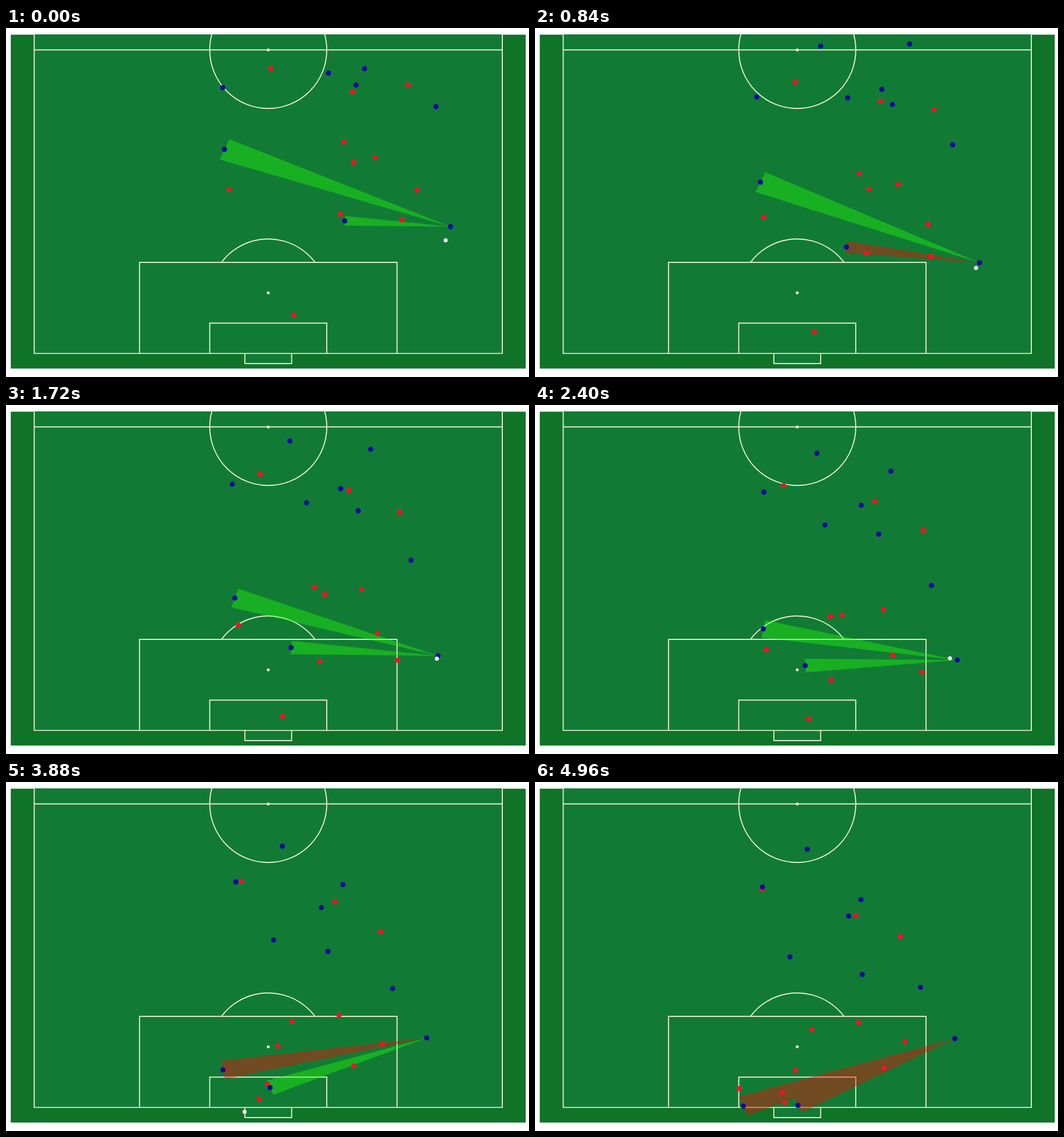
Write an HTML page with a canvas that moves like this. It is 900x600 px and loops after 5000 ms.

```html
<!DOCTYPE html>
<html lang="en">
<head>
<meta charset="utf-8">
<title>Passing lanes</title>
<style>
  html, body { margin: 0; width: 100%; height: 100%; overflow: hidden; background: #fff; }
  canvas { display: block; }
</style>
</head>
<body>
<canvas id="stage" width="900" height="600"></canvas>
<script>
const ctx = document.getElementById('stage').getContext('2d');
const LOOP = 5000, STEP = 40, KICK = 2400, END = LOOP - STEP;
const LANE = Math.tan(Math.PI / 60);      // half-width of a passing lane per unit of length

// The pitch is measured in yards from the centre spot.
const YARD_X = 10.07, YARD_Y = 8.697, CENTRE_X = 451.3, CENTRE_Y = 37.7;
const px = x => CENTRE_X + x * YARD_X;
const py = y => CENTRE_Y + y * YARD_Y;

// Start, middle and end of each plain run.
const RUN = [0, KICK, END];
const redRuns = [
  [455.5,70, 427.5,139, 391.5,184],
  [692.5,98, 668,216.5, 629,265.5],
  [596.5,109.5, 584,166, 552.5,229.5],
  [581.5,196, 508,365, 448.5,495.5],
  [598,231, 527.5,362, 476.5,426],
  [635.5,223, 599.5,353, 557,413.5],
  [384,278, 398,422, 351.5,527]
];
const blueRuns = [
  [740,135, 682,311, 663.5,353],
  [373,102.5, 394,150, 391.5,180.5],
  [555,77.5, 498.5,207, 439,300.5],
  [617,70, 561,173, 539.5,230.5],
  [493,2, 485,83.5, 468.5,115.5],
  [658,-16, 612,114.5, 561,202]
];

// Players close to the ball turn more often.
const TURNS = [0, 840, KICK, 3880, END];
const redTurns = [
  [575.5,320.5, 570.5,387.5, 509.5,473, 450,519, 425.5,534.5],
  [681.5,330, 681,392.5, 666,459, 648,450, 637,446.5],
  [707.5,278.5, 676.5,337.5, 615.5,430, 598.5,488, 600.5,492],
  [495,493.5, 480.5,522.5, 471,539.5, 435.5,545, 429.5,551.5]
];
const blueTurns = [
  [765,341.5, 765,403.5, 726.5,438.5, 724,440, 722.5,441],
  [583,331.5, 536,376.5, 465,448, 454.5,525.5, 452.5,556],
  [376,208.5, 388,265, 393,385, 373.5,495, 358.5,557],
  [602.5,98, 615,131.5, 591.5,222, 554,291, 563,331]
];

const dribble = [756.5,365, 741.5,436, 714,435.5];
const shot = [714,435.5, 560.5,485.5, 410.5,567];

// Parabola through three consecutive waypoints, starting at index i.
function parabola(points, times, i, t) {
  const [a, b, c] = times.slice(i, i + 3);
  const weights = [
    (t - b) * (t - c) / ((a - b) * (a - c)),
    (t - a) * (t - c) / ((b - a) * (b - c)),
    (t - a) * (t - b) / ((c - a) * (c - b))
  ];
  return [0, 1].map(axis =>
    weights.reduce((sum, w, j) => sum + w * points[2 * (i + j) + axis], 0));
}

// Smooth path: blends the two parabolas that share the current segment.
function along(points, times, t) {
  const last = times.length - 3;
  let s = 0;
  while (s <= last && t >= times[s + 1]) s++;
  const u = (t - times[s]) / (times[s + 1] - times[s]);
  const from = parabola(points, times, Math.max(s - 1, 0), t);
  const to = parabola(points, times, Math.min(s, last), t);
  return from.map((v, axis) => v + (to[axis] - v) * u);
}

// Runs start and finish a little slower than their middle part.
const ease = t => t - 150 * Math.sin(2 * Math.PI * t / LOOP);

const team = (turns, runs, t) => [
  ...turns.map(p => along(p, TURNS, t)),
  ...runs.map(p => along(p, RUN, ease(t)))
];

function dot([x, y], radius, color) {
  ctx.fillStyle = color;
  ctx.beginPath();
  ctx.arc(x, y, radius, 0, 2 * Math.PI);
  ctx.fill();
}

// Adds a rectangle symmetric about the long axis, between two depths in yards.
function addBox(halfWidth, top, bottom) {
  ctx.rect(px(-halfWidth), py(top), 2 * halfWidth * YARD_X, (bottom - top) * YARD_Y);
}

function fillBox(halfWidth, top, bottom, color) {
  ctx.fillStyle = color;
  ctx.beginPath();
  addBox(halfWidth, top, bottom);
  ctx.fill();
}

function addArc(y, start, end) {
  const r = 10 * YARD_X;
  ctx.moveTo(CENTRE_X + r * Math.cos(start), y + r * Math.sin(start));
  ctx.arc(CENTRE_X, y, r, start, end);
}

function drawPitch() {
  const line = '#f8f6d4', grass = '#117b35';
  fillBox(44, -3, 63, '#0f7328');
  fillBox(40, -60, 60, grass);
  fillBox(4, 60, 62, grass);

  // One path, so that shared edges are painted once.
  ctx.strokeStyle = line;
  ctx.lineWidth = 1.7;
  ctx.beginPath();
  addBox(40, -60, 60);
  addBox(22, 42, 60);
  addBox(10, 54, 60);
  addBox(4, 60, 62);
  ctx.moveTo(px(-40), CENTRE_Y);
  ctx.lineTo(px(40), CENTRE_Y);
  addArc(CENTRE_Y, 0, 2 * Math.PI);
  const tilt = Math.asin(0.6);
  addArc(py(42) + 6 * YARD_X, Math.PI + tilt, 2 * Math.PI - tilt);
  ctx.stroke();

  for (const y of [0, 48]) dot([CENTRE_X, py(y)], 2.5, line);
}

// A lane turns red when an opponent stands inside it.
function drawLane([x, y], [tx, ty], opponents) {
  const dx = (tx - x) / YARD_X, dy = (ty - y) / YARD_Y;
  const blocked = opponents.some(([ox, oy]) => {
    const ex = (ox - x) / YARD_X, ey = (oy - y) / YARD_Y;
    const forward = ex * dx + ey * dy;
    return forward > 0 && forward < dx * dx + dy * dy &&
      Math.abs(ex * dy - ey * dx) < forward * LANE;
  });
  const wx = dy * LANE * YARD_X, wy = -dx * LANE * YARD_Y;
  ctx.fillStyle = blocked ? 'rgba(255,0,0,.4)' : 'rgba(35,255,5,.4)';
  ctx.beginPath();
  ctx.moveTo(x, y);
  ctx.lineTo(tx + wx, ty + wy);
  ctx.lineTo(tx - wx, ty - wy);
  ctx.fill();
}

function draw(t) {
  const reds = team(redTurns, redRuns, t);
  const blues = team(blueTurns, blueRuns, t);
  const [holder, near, far] = blues;
  const ball = t < KICK ? along(dribble, [0, 1720, KICK], t) : along(shot, [KICK, 3040, 3880], t);

  ctx.clearRect(0, 0, 900, 600);
  ctx.save();
  ctx.beginPath();
  ctx.rect(8, 11, 887, 575);
  ctx.clip();
  drawPitch();
  drawLane(holder, far, reds);
  drawLane(holder, near, reds);
  reds.forEach(p => dot(p, 4.5, '#f91222'));
  blues.forEach(p => dot(p, 4.5, '#100a9e'));
  dot(ball, 3.5, '#fff');
  ctx.restore();
}

function tick() {
  const t = performance.now() % LOOP;
  draw(Math.floor(t / STEP) * STEP);
  requestAnimationFrame(tick);
}
tick();
</script>
</body>
</html>
```
